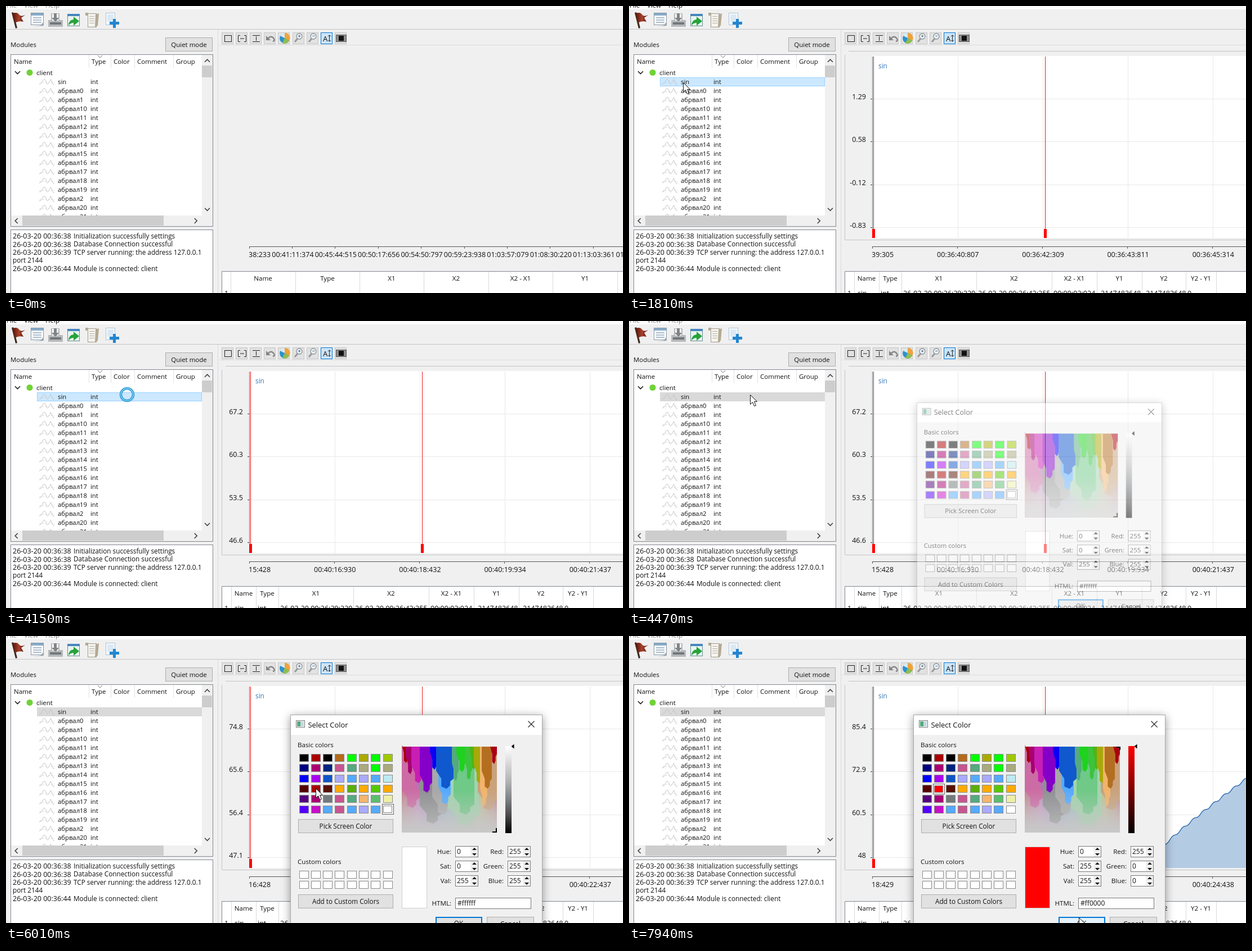
An HTML page for the animation above (8 s loop, 1096x511 px).

```html
<!DOCTYPE html>
<html lang="en">
<head>
<meta charset="utf-8">
<title>Select Color</title>
<style>
html, body { margin: 0; width: 100%; height: 100%; overflow: hidden; background: #f0f0f0; }
svg { display: block; width: 1096px; height: 511px; }
text { font-family: 'Open Sans', 'Noto Sans', sans-serif; white-space: pre; }
#dialogBack { filter: drop-shadow(0 3px 8px rgba(0, 0, 0, .4)); }
</style>
</head>
<body>
<svg id="stage" viewBox="0 0 1096 511"></svg>
<script>
const LOOP = 8000, INK = '#111', FACE = '#f0f0f0', NUM = 12.5;

// Markup helpers. Boxes take outer pixel bounds; text takes its vertical centre.
const box = (x, y, x2, y2, fill, edge) => edge
  ? `<rect x="${x + .5}" y="${y + .5}" width="${x2 - x - 1}" height="${y2 - y - 1}" fill="${fill}" stroke="${edge}"/>`
  : `<rect x="${x}" y="${y}" width="${x2 - x}" height="${y2 - y}" fill="${fill}"/>`;
const path = (d, stroke = INK, width = 1, fill = 'none') =>
  `<path d="${d}" fill="${fill}" stroke="${stroke}" stroke-width="${width}"/>`;
const shape = (d, fill) => `<path d="${d}" fill="${fill}"/>`;
const dot = (x, y, r, fill, stroke = 'none', width = 1) =>
  `<circle cx="${x}" cy="${y}" r="${r}" fill="${fill}" stroke="${stroke}" stroke-width="${width}"/>`;
const text = (x, y, s, size = 11.6, anchor = 'start', fill = INK) =>
  `<text x="${x}" y="${y + size * .36}" font-size="${size}" text-anchor="${anchor}" fill="${fill}">${s}</text>`;
const group = (id, body, attrs = '') => `<g id="${id}" ${attrs}>${body}</g>`;
const at = (steps, t) => steps.findLast(s => s[0] <= t);
const repeat = (n, fn) => Array.from({ length: n }, (_, i) => fn(i)).join('');

// Chevron around a centre, pointing along dx or dy
const chevron = (x, y, dx, dy, r = 4.5, stroke = '#444', width = 1.7) => {
  const a = r / 2;
  return path(`M${x - dx * a - dy * r} ${y - dy * a - dx * r}L${x + dx * a} ${y + dy * a}L${x - dx * a + dy * r} ${y - dy * a + dx * r}`, stroke, width);
};

// ---- Left side
function mainToolbar() {
  return box(0, 0, 1096, 6, '#fcfcfc') + path('M0 41.5H1096', '#c4c4c4')
    + group('menu', text(1, -1, 'File') + text(32, -1, 'View') + text(70, -1, 'Help'))
    + shape('M10 12l3 -1 7 28 -3 1z', '#3c2a20') + shape('M12 13q8 -3 11 2t11 1l-7 5 4 7q-9 -2 -15 2z', 'url(#flag)')
    + box(44, 12, 67, 34, '#fff', '#8296a8') + box(45, 13, 66, 17, '#86aac8')
    + repeat(3, i => box(48, 20 + i * 4, 63, 22 + i * 4, '#aabccb')) + shape('M48 37l19 -2v-7l-6 7z', '#9aa5ae')
    + shape('M80 13h15v12h6v12h-26v-12h5z', '#b6b9bb') + box(82, 14, 93, 26, '#f7f7f7')
    + shape('M85 13h5v8h4l-6 7 -7 -7h4z', '#808487') + box(78, 29, 98, 33, '#72777a')
    + box(109, 14, 131, 36, '#e9f3ef', '#688c92') + box(109, 14, 131, 18, '#4685bd')
    + shape('M111 35q0 -10 9 -11v-5l10 8 -10 8v-5q-6 0 -9 5z', '#27a33b')
    + box(145, 13, 161, 38, '#f4f3ee', '#a29b8d') + repeat(4, i => box(148, 18 + i * 4, 157, 19 + i * 4, '#b6b0a3'))
    + shape('M141 12h5v5h-5zM159 15l6 -2 -2 22 -5 3z', '#b3a994')
    + box(177, 12, 194, 34, '#f8fbfd', '#aac3d7') + box(180, 15, 191, 28, '#dbe9f4')
    + box(190, 23, 195, 39, '#2386d0') + box(184, 28, 201, 33, '#2386d0');
}

const names = ['sin', ...Array.from({ length: 22 }, (_, i) => 'абрвал' + i).sort()].slice(0, 16);
const wave = y => path(`M59 ${y + 4}q4 0 6 -5t4 -3 3 6 4 0 3 -6 3 5 3 3`, '#c3c3c3')
  + path(`M60 ${y + 1.5}h26`, '#d6d6d6').replace('/>', ' stroke-dasharray="2 3"/>');

function tree() {
  const heads = [[14, 'Name'], [152, 'Type'], [191, 'Color'], [233, 'Comment'], [302, 'Group']];
  const rows = names.map((name, i) => {
    const y = 135 + i * 16;
    return wave(y) + text(92, y, name, 11.3) + text(150, y, 'int', 11.3);
  }).join('');
  return text(8, 69, 'Modules', 11.4) + box(283, 56, 367, 81, '#e1e1e1', '#adadad')
    + text(325, 69, 'Quiet mode', 11.5, 'middle')
    + box(8, 86, 368, 393, '#fff', '#828790')
    + heads.map(([x, s], i) => text(x, 99, s, 11.5) + (i ? box(x - 5, 87, x - 4, 110, '#e2e2e2') : '')).join('')
    + chevron(167, 90, 0, 1, 4, '#777', 1)
    + group('rowMark', '') + chevron(20.5, 118.5, 0, 1, 4.5, '#222')
    + dot(42, 118.5, 5.6, '#70d336') + text(54, 119, 'client', 11.5)
    + group('rows', rows, 'clip-path="url(#treeClip)"')
    + box(348, 87, 367, 373, FACE) + box(348, 106, 366, 127, '#cdcdcd')
    + box(9, 373, 367, 392, FACE) + box(29, 373, 280, 391, '#cdcdcd')
    + chevron(357.5, 97.5, 0, -1) + chevron(357.5, 362, 0, 1)
    + chevron(18.5, 382.5, -1, 0) + chevron(337, 382.5, 1, 0);
}

function log() {
  const lines = [[38, 'Initialization successfully settings'], [38, 'Database Connection successful'],
    [39, 'TCP server running: the address 127.0.0.1'], null, [44, 'Module is connected: client']];
  return box(8, 398, 368, 520, '#fff', '#828790') + lines.map((line, i) => {
    const y = 409.5 + i * 14.5;
    return line ? text(12, y, '26-03-20 00:36:' + line[0], NUM) + text(120, y, line[1], 11.75)
      : text(12, y, 'port 2144', 11.75);
  }).join('');
}

// ---- Plot side
function plotToolbar() {
  const glass = (x, sign) => path(`M${x + 5} 64l5 -6`, '#9a9a9a', 3)
    + dot(x + 13, 54, 5, '#e9f4fb', '#8c9299', 1.3) + text(x + 13, 54, sign, 9, 'middle');
  return path('M376.5 42V511', '#dcdcdc') + path('M378 69.5H1096', '#dcdcdc')
    + repeat(9, i => {
      const x = Math.round(383 + i * 25.1), on = i === 7;
      return box(x, 47, x + 21, 68, on ? '#cce4f7' : '#e2e2e2', on ? '#0078d7' : '#c6c6c6');
    })
    + box(388, 52, 401, 64, 'none', '#222')
    + path('M416 52.5h-3.5v11h3.5M423 52.5h3.5v11h-3.5M416 58h7', '#222')
    + path('M438 52.5h13M438 63.5h13M444.5 54v8', '#222')
    + path('M465 58q6 -6 10 -1t-1 6', '#858585', 2.4) + shape('M462 53v8h8z', '#858585')
    + dot(495, 57.5, 9, '#2c92cf') + shape('M495 57V48A9 9 0 0 1 503 62z', '#f0a23a')
    + shape('M495 57L503 62A9 9 0 0 1 491 66z', '#8ebe52') + shape('M495 57L487 53A9 9 0 0 1 495 48z', '#d7eaf5')
    + glass(508, '+') + glass(533, '−')
    + text(563, 58, 'A', 13) + path('M574.5 52v11', '#222')
    + chevron(574.5, 53, 0, -1, 2.5, '#222', 1) + chevron(574.5, 62, 0, 1, 2.5, '#222', 1)
    + box(586, 51, 605, 64, '#8d8d8d', '#555') + box(591, 53, 600, 62, '#111');
}

// Labels sit in the middle of their columns, cells at the left of them.
function table(edges, labels, cells = []) {
  return box(383, 472, 1100, 520, '#fff') + path('M383.5 520V472.5H1096', '#828790')
    + edges.map(x => box(x, 473, x + 1, 511, '#dadada')).join('')
    + labels.map((s, i) => text((edges[i] + edges[i + 1]) / 2, 484.5, s, 11.6, 'middle')).join('')
    + text(388, 511, '1', NUM) + cells.map((s, i) => text(edges[i] + (i ? 3 : 6), 511, s, NUM)).join('');
}

const emptyView = () => table([399, 514, 628, 742, 857, 971, 1086], ['Name', 'Type', 'X1', 'X2', 'X2 - X1', 'Y1']);

function liveView() {
  return path('M390 80.5H1096M383.5 87V416.5H1096', '#c4c4c4') + box(432, 89, 1096, 413, '#fff')
    + repeat(4, i => {
      const y = 165 + Math.round(i * 76.4), x = 584 + Math.round(i * 151.1);
      return box(432, y, 1096, y + 1, '#e9e9e9') + box(x, 90, x + 1, 413, '#e9e9e9') + box(429, y, 432, y + 1, '#444');
    })
    + path('M432.5 90V413', '#777')
    + group('curve', '', 'clip-path="url(#plotClip)"')
    + [434.5, 739.5].map(x => path(`M${x} 90V413`, '#f01818') + box(x - 2.5, 397, x + 2.5, 413, '#f00')).join('')
    + text(443, 107, 'sin', 11.8, 'start', '#3577b5')
    + table([400, 444, 484, 617, 751, 831, 911, 989, 1043],
      ['Name', 'Type', 'X1', 'X2', 'X2 - X1', 'Y1', 'Y2', 'Y2 - Y1'],
      ['sin', 'int', '26-03-20 00:36:39:330', '26-03-20 00:36:42:355', '00:00:03:024', '-2147483648', '-2147483648', '0']);
}

const pad = (n, w = 2) => String(Math.floor(n)).padStart(w, '0');
const clock = ms => [pad(ms / 36e5), pad(ms / 6e4 % 60), pad(ms / 1e3 % 60), pad(ms % 1e3, 3)].join(':');

function timeAxis(start, step, gap) {
  let marks = 'M432 428.5H1096', labels = '';
  for (let i = 0; i * gap < 720; i++) {
    const x = 432.5 + i * gap;
    marks += `M${Math.round(x) - .5} 428v4`;
    labels += text(x + .5, 442, clock(start + i * step), NUM, 'middle');
  }
  return path(marks, '#555') + `<g clip-path="url(#axisClip)">${labels}</g>`;
}

const valueLabel = v => Math.abs(v) < 10 ? v.toFixed(2) : String(+v.toFixed(1));
const valueAxis = (top, step) => repeat(4, i =>
  text(421, 161 + i * 76.5, valueLabel(top - i * step), NUM, 'end'));

// Signal in plot pixels for the last axis range, rescaled to any other range.
function signal(start, top, step) {
  const shift = (2418429 - start) * .10065, floor = top - 3 * step;
  if (shift > 200) return '';
  let line = '';
  for (let x = 898; x <= 1098; x += 3) {
    const run = (x - 952) / 144;
    const y = 372 - 117 * (run > 0 ? run ** .92 : run * 1.1) + 2 * Math.sin((x - 952) / 2.9);
    const value = 48.02 + (395 - y) / 76.3 * 12.46;
    line += `${line ? 'L' : 'M'}${x + shift} ${(394.5 - (value - floor) / step * 76.3).toFixed(1)}`;
  }
  return shape(line + 'V420H880z', '#b4cbe4') + path(line, '#3673b5', 1.5);
}

// ---- Colour dialog
const paint = {
  k: 'black', r: '#a00', o: '#b56b1b', g: 'lime', y: '#aa0', l: '#9fc800', n: 'navy', m: '#aa0074', c: '#00247f',
  p: '#c85590', t: '#55aa7f', h: '#aaaa7f', b: 'blue', v: '#aa00f0', s: '#0f55c8', a: '#aaf', u: '#5af', w: '#bceaf0',
  d: '#500', e: '#551000', f: '#fa0', q: '#5aaf0a', x: '#55c800', i: '#55007f', j: '#727a7c', z: '#f5b66e',
  D: '#5abf6e', A: '#eef0a8', B: '#50f', C: '#c80fc8', W: 'white' };
const swatches = 'krkogyglnmcpthghbvsauauwdrefqfxfimjptzDABCupuauW';

// Left edge, width, lowest point, colour
const pale = [[703, 32, 306, '#cc6ca4'], [728, 34, 300, '#b873b0'], [735, 40, 334, '#8f9092'],
  [757, 33, 318, '#a8a8a8'], [785, 55, 338, '#a3d3ad'], [795, 37, 318, '#6fc987'], [838, 34, 310, '#c9a27c']];
const vivid = [[703, 13, 226, '#a00'], [710, 14, 246, '#a80070'], [720, 22, 262, '#c81eb4'], [735, 22, 279, '#8400c8'],
  [753, 14, 238, '#0a00f5'], [768, 22, 300, '#5af'], [764, 31, 272, '#0f58cd'], [792, 12, 258, '#55aa7f'],
  [800, 18, 242, '#1ed21e'], [815, 13, 256, '#3cc33c'], [824, 12, 238, '#50b414'], [831, 17, 262, '#a8a80a'],
  [842, 13, 303, '#f2b46c'], [845, 18, 272, '#b46e20'], [860, 12, 228, '#aa0010']];
const flame = ([x, w, tip, fill]) => {
  const r = x + w, m = tip - 18;
  return shape(`M${x} 197H${r}V${m}L${r - w * .2} ${m + 5}V${tip - 6}L${r - w * .4} ${tip}L${x + w * .3} ${tip - 4}V${m}L${x} ${m - 14}z`, fill);
};
const spectrum = () => box(703, 197, 872, 350, 'url(#hues)') + box(703, 197, 872, 350, 'url(#fade)')
  + pale.map(flame).join('') + vivid.map(flame).join('') + box(703, 197, 872, 350, 'url(#haze)');

const spin = (x, y, label, value) => text(x - 7, y, label, 11.6, 'end')
  + box(x, y - 10, x + 41, y + 10, '#fff', '#7a7a7a') + box(x + 27, y - 9, x + 40, y + 9, FACE)
  + shape(`M${x + 30} ${y - 3}l4 -4 4 4zM${x + 30} ${y + 3}l4 4 4 -4z`, INK) + text(x + 3, y, value, 12);

function chosen(picked) {
  const rest = picked ? 0 : 255, [x, y] = picked ? [540, 263] : [668, 299], color = picked ? 'red' : 'white';
  return box(x, y, x + 21, y + 19, '#f8f8f8', '#666') + box(x + 2, y + 3, x + 18, y + 16, color, '#888')
    + box(703, 375, 748, 485, color, '#d0d0d0')
    + box(887, 196, 898, 351, picked ? 'url(#redRamp)' : 'url(#grayRamp)')
    + path(picked ? 'M866 198h6v5' : 'M864 349h7v-7', '#000', 2)
    + ['Hue:', 'Sat:', 'Val:'].map((s, i) => spin(798, 384 + i * 26, s, [0, 255 - rest, 255][i])).join('')
    + ['Red:', 'Green:', 'Blue:'].map((s, i) => spin(891, 384 + i * 26, s, i ? rest : 255)).join('')
    + text(802, 476, picked ? '#ff0000' : '#ffffff', 12);
}

function dialog() {
  const button = (x, y, x2, s) => box(x, y, x2, y + 25, '#e1e1e1', '#adadad') + text((x + x2) / 2, y + 12.5, s, 11.7, 'middle');
  const cell = (i, y, fill) => {
    const x = Math.round(520.5 + i * 21.3);
    return box(x, y, x + 17, y + 14, fill, '#8b8b8b');
  };
  return box(505, 140, 953, 560, FACE, '#a8a8a8').replace('<rect', '<rect id="dialogBack"')
    + box(506, 141, 952, 176, '#fff')
    + box(515, 150, 531, 163, '#fff', '#777') + box(517, 152, 523, 161, '#55aa7f') + box(523, 152, 529, 161, '#c4d9df')
    + text(536.5, 158, 'Select Color', 12.9) + path('M927.5 151.5l11 11m0 -11l-11 11', '#222', 1.1)
    + text(518, 194, 'Basic colors') + text(518, 402, 'Custom colors')
    + [...swatches].map((key, i) => cell(i % 8, 210 + Math.round((i >> 3) * 18.3), paint[key])).join('')
    + repeat(16, i => cell(i % 8, i < 8 ? 418 : 436, '#fff'))
    + button(519, 326, 688, 'Pick Screen Color') + button(519, 460, 688, 'Add to Custom Colors')
    + spectrum() + shape('M897.5 196.5l5 -4v8z', '#000')
    + text(791, 476, 'HTML:', 11.6, 'end') + box(798, 466, 933, 486, '#fff', '#7a7a7a')
    + group('white', chosen(false)) + group('red', chosen(true))
    + `<rect id="ok" x="764" y="501" width="81" height="24" stroke="#0078d7" stroke-width="2"/>`
    + text(804, 512, 'OK', 11.7, 'middle') + button(854, 500, 938, 'Cancel');
}

const ramp = (id, stops, vertical = true) =>
  `<linearGradient id="${id}" ${vertical ? 'x2="0" y2="1"' : ''}>${stops.map((s, i) =>
    `<stop offset="${i / (stops.length - 1)}" stop-color="${s}"/>`).join('')}</linearGradient>`;
const clip = (id, ...b) => `<clipPath id="${id}">${box(...b, '#000')}</clipPath>`;

document.getElementById('stage').innerHTML = `<defs>
  ${ramp('flag', ['#5a1208', '#a8432c', '#4a0c06'], false)}
  ${ramp('hues', ['#c00010', '#c814b4', '#2820e0', '#28a0c8', '#28c828', '#b4b414', '#c00010'], false)}
  ${ramp('fade', ['#c8c8c800', '#c8c8c8a0', '#c8c8c8'])}
  ${ramp('haze', ['#c8c8c800', '#c8c8c800', '#c8c8c8c0'])}
  ${ramp('redRamp', ['red', 'black'])}
  ${ramp('grayRamp', ['white', '#d8d8d8', '#b4b4b4', '#808488', '#484848', 'black'])}
  ${clip('treeClip', 9, 111, 348, 373)}${clip('axisClip', 432, 430, 1096, 455)}${clip('plotClip', 433, 90, 1096, 413)}
  </defs>` + box(0, 0, 1096, 511, FACE) + mainToolbar() + tree() + log() + plotToolbar()
  + group('empty', emptyView()) + group('live', liveView()) + group('axis', '')
  + group('dialog', dialog())
  + group('ring', dot(0, 0, 11, 'none', '#2f9bd6', 4.5) + dot(0, 0, 11, 'none', '#7fd0f3', 1.5))
  + group('cursor', path('M.5 .5v17l4 -4 3 7 3 -1 -3 -7h5z', INK, 1, '#fff'));

// ---- Timeline
const axes = [ // time, first label in ms, top value label, value step
  [1740, 2199305, 1.29, .7067], [2210, 2413427, -.4715, .4715], [3220, 2414428, 59.5, 4.5],
  [4150, 2415428, 67.2, 6.86], [5180, 2416428, 74.84, 9.24], [6160, 2417428, 80.1, 10.8], [7170, 2418429, 85.4, 12.46]];

const legs = [ // first step, last step, number of steps, end x, end y, bend
  [100, 100, 1, 824, 429, 0], [180, 260, 2, 480, 292, 0], [560, 640, 2, 98, 157, 0], [960, 1340, 6, 96, 136, 0],
  [2440, 3130, 10, 208, 138, -8], [3220, 3220, 1, 211, 136, 0], [3280, 3510, 4, 223, 130, -2], [3680, 3830, 3, 215, 131, -2],
  [5000, 5300, 5, 549, 247, 0], [5700, 6010, 5, 550, 271, 0], [6710, 7250, 8, 802, 500, 0], [7630, 7940, 5, 799, 501, -3]];

function pointer(t) {
  let x = -50, y = -50;
  for (const [start, end, count, toX, toY, bend] of legs) {
    if (t < start) break;
    const gap = (end - start) / (count - 1) || 1;
    const p = Math.min(1, (Math.floor((t - start) / gap + .001) + 1) / count);
    const ease = p * p * (3 - 2 * p);
    x += (toX - x) * ease;
    y += (toY - y) * ease + bend * Math.sin(Math.PI * p);
  }
  return [Math.round(x), Math.round(y)];
}

const opening = [[4310, .08, .953], [4390, .28, .963], [4470, .5, .973], [4550, .8, .988], [4620, .95, .997], [4690, 1, 1]];

const el = Object.fromEntries([...document.querySelectorAll('[id]')].map(e => [e.id, e]));
const show = (e, on) => e.setAttribute('visibility', on ? 'inherit' : 'hidden');
let shownAxis = null;

function drawAxis(axis) {
  if (shownAxis === axis) return;
  shownAxis = axis;
  if (!axis) {
    el.axis.innerHTML = timeAxis(2198233, 273141, 76.4);
    return;
  }
  const [, start, top, step] = axis;
  el.axis.innerHTML = timeAxis(start, 1502.25, 151.2) + valueAxis(top, step);
  el.curve.innerHTML = signal(start, top, step);
}

function drawRowMark(t, x, y) {
  const hovered = x >= 55 && x < 347 && y >= 127 && y < 372;
  const row = t >= 1570 ? 0 : hovered ? Math.floor((y - 127) / 16) : -1;
  const [fill, edge] = t >= 4310 ? ['#d9d9d9'] : t >= 1570 ? ['#cce8ff', '#99d1ff'] : ['#e5f3ff'];
  el.rowMark.innerHTML = row < 0 ? '' : box(55, 127 + row * 16, 348, 143 + row * 16, fill, edge);
}

function draw(t) {
  const [x, y] = pointer(t);
  const busy = t >= 1570 && t < 1810 || t >= 4150 && t < 4310;
  const live = t >= 1740, open = at(opening, t);
  show(el.empty, !live);
  show(el.live, live);
  drawAxis(at(axes, t));
  drawRowMark(t, x, y);
  for (const label of el.menu.children) label.setAttribute('fill', t >= 1570 && t < 4310 ? INK : '#888');

  show(el.dialog, open);
  if (open) {
    const [, alpha, scale] = open;
    el.dialog.setAttribute('opacity', alpha);
    el.dialog.setAttribute('transform', `translate(728.5 335) scale(${scale}) translate(-728.5 -335)`);
  }
  show(el.white, t < 6400);
  show(el.red, t >= 6400);
  el.ok.setAttribute('fill', x >= 763 && y >= 496 ? '#e5f1fb' : '#e1e1e1');

  show(el.cursor, !busy);
  show(el.ring, busy);
  el.cursor.setAttribute('transform', `translate(${x} ${y})`);
  el.ring.setAttribute('transform', `translate(${x} ${y})`);
}

const begin = performance.now();
function tick() {
  draw((performance.now() - begin) % LOOP);
  requestAnimationFrame(tick);
}
tick();
</script>
</body>
</html>
```
